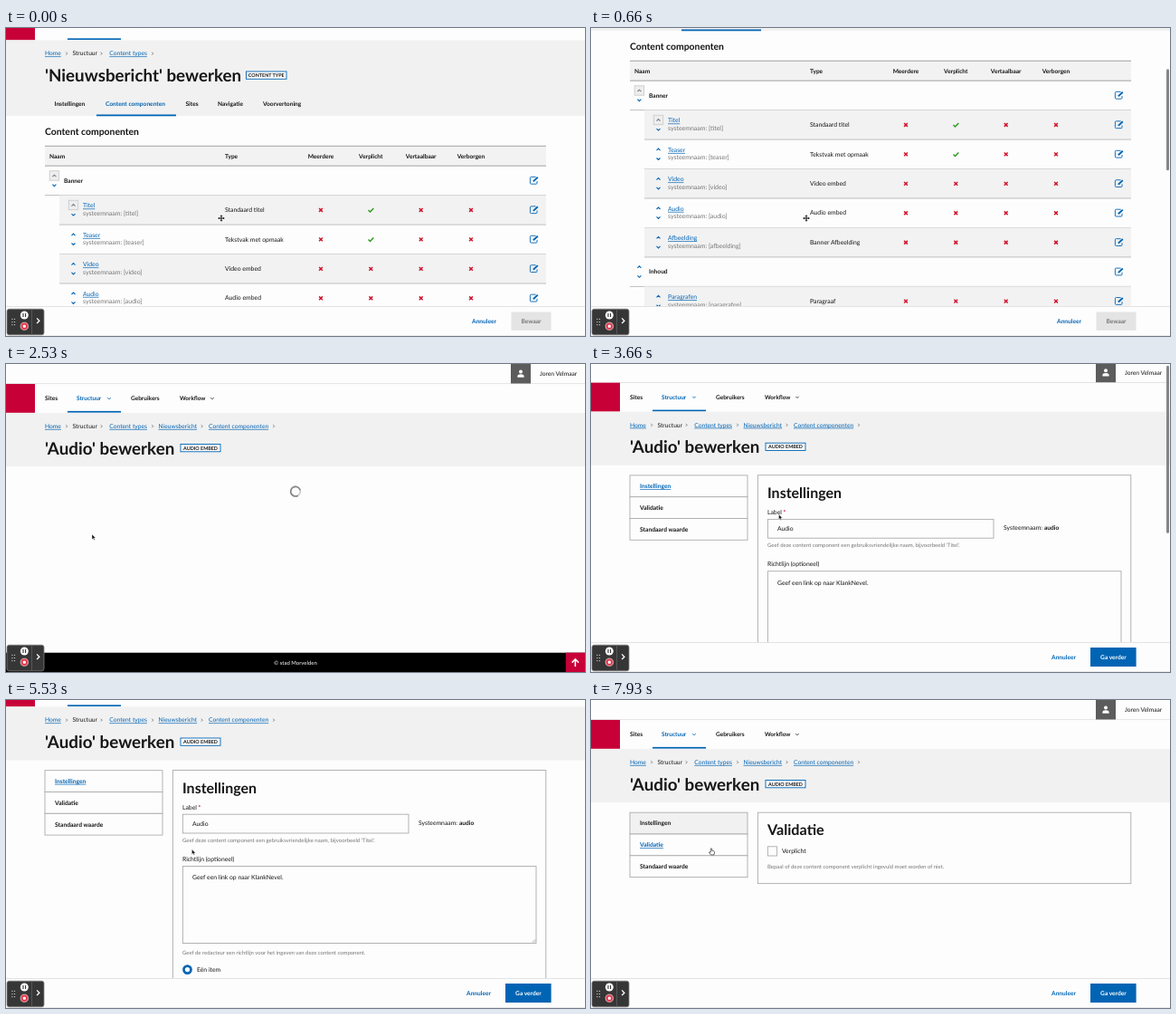
Recreate the animation shown at these times as an HTML page. Size 640 px wide and 340 px high, loop 8 s.

```html
<!DOCTYPE html>
<html lang="nl">
<head>
<meta charset="utf-8">
<title>Contenttype bewerken</title>
<style>
html, body { margin: 0; height: 100%; overflow: hidden; background: #fdfdfd; }
svg { display: block; width: 100vw; height: 100vh; }
text { font-family: Lato, "Open Sans", sans-serif; fill: #161616; text-rendering: geometricPrecision; }
.bold { font-weight: 700; }
.blue { fill: #0064b4; }
.link { fill: #0064b4; text-decoration: underline; }
.mid { text-anchor: middle; }
.gray { fill: #767676; }
.white { fill: #fff; }
.red { fill: #c80038; }
</style>
</head>
<body>
<svg id="stage" viewBox="0 0 640 340"></svg>
<script>
const BLUE = '#0064b4', RED = '#c80038', PALE = '#f1f1f1', LINE = '#acacac';

// y is the middle of the capitals
const text = (x, y, s, cls = '', size = 6.8) =>
  `<text x="${x}" y="${y + size * .36}" font-size="${size}" class="${cls}">${s}</text>`;
const bold = (x, y, s, cls = '', size = 6.6) => text(x, y, s, 'bold ' + cls, size);
const rect = (x, y, w, h, fill, more = '') =>
  `<rect x="${x}" y="${y}" width="${w}" height="${h}" fill="${fill}" ${more}/>`;
const box = (x, y, w, h, fill = '#fdfdfd', stroke = LINE) =>
  rect(x, y, w, h, fill, `stroke="${stroke}" stroke-width=".9"`);
const path = (d, stroke, width = 1, more = '') =>
  `<path d="${d}" fill="none" stroke="${stroke}" stroke-width="${width}" ${more}/>`;
const group = (id, body, y = 0) => `<g id="${id}" transform="translate(0 ${y})">${body}</g>`;
const chevron = (x, y, turn, color, size = 2, width = 1.1) =>
  path(`M${-size} ${-size / 2}L0 ${size / 2} ${size} ${-size / 2}`, color, width,
    `transform="translate(${x} ${y}) rotate(${turn})"`);

function header() {
  return rect(0, 0, 640, 54, '#fdfdfd') + rect(0, 21.3, 640, .8, '#ddd') +
    rect(558, 0, 22, 21.5, '#5c5c5c') +
    '<circle cx="569" cy="8.6" r="2" fill="#fff"/><path d="M565.4 14.8V13.4Q565.6 11.2 569 11.2T572.6 13.4V14.8Z" fill="#fff"/>' +
    text(590, 10.7, 'Joren Velmaar', '', 6.7) +
    rect(0, 22, 32, 31.8, RED) +
    bold(43, 38, 'Sites') + bold(78, 38, 'Structuur', 'blue', 6.5) +
    bold(138, 38, 'Gebruikers', '', 6.5) + bold(192, 38, 'Workflow', '', 6.4) +
    chevron(114, 38, 0, BLUE, 1.7, .9) + chevron(228, 38, 0, '#333', 1.7, .9) +
    rect(68, 51.9, 59, 1.7, BLUE);
}

function crumbs(items) {
  return items.map(([x, s, end]) =>
    text(x, 68.5, s, s === 'Structuur' ? '' : 'link', 6.7) +
    chevron(end, 68.7, -90, '#666', 1.5, .8)).join('');
}
const trail = [[43, 'Home', 67], [73.5, 'Structuur', 105.5], [114.3, 'Content types', 162]];

const badge = (x, w, s) => box(x, 88.5, w, 8.3, '#fdfdfd', BLUE) + bold(x + w / 2, 92.7, s, 'mid', 5.4);

const editIcon = y =>
  path(`M585.6 ${y - 3.8}H580.4Q579.4 ${y - 3.8} 579.4 ${y - 2.8}V${y + 3}Q579.4 ${y + 4} 580.4 ${y + 4}H586Q587 ${y + 4} 587 ${y + 3}V${y + .8}`, BLUE, .9) +
  path(`M582.8 ${y + 1.2}L587.8 ${y - 3.4}`, BLUE, 1.9);
const cross = (x, y) => path(`M${x - 1.9} ${y - 1.9}l3.8 3.8m0 -3.8l-3.8 3.8`, '#d0142c', 1.5);
const check = (x, y) => path(`M${x - 2.8} ${y}l2 2 3.8 -4`, '#2b9a1c', 1.4);

const columns = [[348, 'Meerdere'], [403.3, 'Verplicht'], [458.7, 'Vertaalbaar'], [514, 'Verborgen']];
const rows = [
  ['Banner'],
  ['Titel', 'Standaard titel', 1], ['Teaser', 'Tekstvak met opmaak', 1],
  ['Video', 'Video embed'], ['Audio', 'Audio embed'], ['Afbeelding', 'Banner Afbeelding'],
  ['Inhoud'],
  ['Paragrafen', 'Paragraaf']
];

function tableRow([name, type, required], i) {
  const y = 168.2 + 32.45 * i, left = type ? 59 : 43, cx = type ? 74.5 : 53.4;
  let s = type && i % 2 ? rect(left, y - 16, 597 - left, 32.4, '#f2f2f2') : '';
  s += rect(left, y + 16, 597 - left, .9, '#b9b9b9');
  if (i < 2) s += box(cx - 5.2, y - 10.4, 10.4, 10.4, '#eee', '#ccc');
  s += chevron(cx, y - 5, 180, i < 2 ? '#6d7f90' : BLUE) + chevron(cx, y + 5.4, 0, BLUE) + editIcon(y);
  if (!type) return s + bold(64, y, name);
  return s + text(85, y - 4.6, name, 'link') +
    text(85, y + 3.7, `systeemnaam: [${name.toLowerCase()}]`, 'gray', 6.95) +
    text(242, y, type, '', 6.85) +
    columns.map(([x], c) => (c === 1 && required ? check : cross)(x, y + .3)).join('');
}

function listPage() {
  const tabs = [[53.5, 'Instellingen'], [110, 'Content componenten', 'blue'], [198.5, 'Sites'],
    [234, 'Navigatie'], [284, 'Voorvertoning']];
  return rect(0, 54, 640, 83.5, PALE) + crumbs(trail) +
    bold(43, 92.7, "'Nieuwsbericht' bewerken", '', 18.8) + badge(265.5, 44.5, 'CONTENT TYPE') +
    tabs.map(([x, s, cls]) => bold(x, 124.6, s, cls)).join('') + rect(100, 136, 88, 1.8, BLUE) +
    group('table',
      bold(43, 114, 'Content componenten', '', 10.4) +
      rect(43, 130, 554, 22, '#f2f2f2') + rect(43, 129.8, 554, .9, '#999') + rect(43, 151.7, 554, .9, '#999') +
      bold(48, 141.2, 'Naam') + bold(242, 141.2, 'Type') +
      columns.map(([x, s]) => bold(x, 141.2, s, 'mid')).join('') +
      rows.map(tableRow).join(''), 40.5);
}

function editHead() {
  return rect(0, 54, 640, 59, PALE) +
    crumbs([...trail, [168.5, 'Nieuwsbericht', 216.5], [224, 'Content componenten', 296]]) +
    bold(43, 92.8, "'Audio' bewerken", '', 18.8) + badge(193, 44, 'AUDIO EMBED');
}

function settingsPanel() {
  return box(184.4, 77.5, 412.4, 480) + bold(195, 97, 'Instellingen', '', 16) +
    text(195, 118.3, 'Label') + bold(212.6, 118.6, '*', 'red') +
    box(195.4, 126.2, 249.6, 20.8) + text(206, 136.6, 'Audio') +
    text(456, 135.8, 'Systeemnaam:') + bold(501, 135.8, 'audio') +
    text(195, 154.8, "Geef deze content component een gebruiksvriendelijke naam, bijvoorbeeld 'Titel'.", 'gray', 6) +
    text(195, 175.8, 'Richtlijn (optioneel)') +
    box(195.4, 183.5, 390.6, 85) + text(206, 196, 'Geef een link op naar KlankNevel.') +
    path('M582 267.5l3 -3M584 267.5l1.2 -1.2', '#777', .6) +
    text(195, 279, 'Geef de redacteur een richtlijn voor het ingeven van deze content component.', 'gray', 5.95) +
    `<circle cx="200.5" cy="297.6" r="4" fill="#fff" stroke="${BLUE}" stroke-width="2.7"/>` +
    text(211, 297.6, 'Eén item');
}

function validationPanel() {
  return box(184.4, 124.2, 412.4, 78.4) + bold(195, 143.3, 'Validatie', '', 16.2) +
    box(195.4, 161.8, 10.2, 10.2) + text(211, 167, 'Verplicht') +
    text(195, 183.6, 'Bepaal of deze content component verplicht ingevuld moet worden of niet.', 'gray', 5.97);
}

function menu(active, hover, fading) {
  return ['Instellingen', 'Validatie', 'Standaard waarde'].map((s, i) =>
    box(43, 124.2 + 23.8 * i, 130, 23.8, i === hover ? PALE : '#fdfdfd') +
    bold(54, 135.9 + 24 * i, s, i === active ? 'link' : i === fading ? 'blue' : '', 6.7)).join('');
}

const bar = rect(0, 307, 640, 33, '#fdfdfd') + rect(0, 307, 640, .8, '#ddd') + rect(0, 339, 640, 1, '#e8e8e8');
const listBar = bar + bold(528.5, 323.5, 'Annuleer', 'blue mid') +
  rect(558.5, 313.5, 44, 20.3, '#e4e4e4') + bold(580.5, 323.5, 'Bewaar', 'mid gray');
const formBar = bar + bold(522.5, 323.5, 'Annuleer', 'blue mid') +
  rect(552, 313, 50.6, 21, BLUE) + bold(577.4, 323.5, 'Ga verder', 'white mid');

const loading =
  '<g id="spin"><circle r="5.3" fill="none" stroke="#ccc" stroke-width="1.6"/>' +
  '<circle r="5.3" fill="none" stroke="#888" stroke-width="1.6" stroke-dasharray="26 7.3"/></g>' +
  rect(0, 318.7, 640, 21.3, '#000') + text(320, 329.6, '© stad Morvelden', 'white mid', 6) +
  rect(618.7, 318.7, 21.3, 21.3, RED) + path('M629.3 334V326M625.6 329.6L629.3 325.8 633 329.6', '#fff', 1.6);

function recorder() {
  let s = rect(1, 310.2, 41, 28.6, '#363636', 'rx="2.5" stroke="#808080" stroke-width=".8"');
  for (let i = 0; i < 6; i++) s += rect(6.3 + 2.6 * (i % 2), 320.8 + 3.1 * (i >> 1), 1.2, 1.2, '#bbb');
  return s + '<circle cx="20.3" cy="317" r="4.5" fill="#fff"/>' + path('M19 315v4M21.6 315v4', '#333', 1.1) +
    '<circle cx="20.3" cy="329.2" r="4.1" fill="#e0354b" stroke="#f3d5d9" stroke-width=".8"/>' +
    rect(18.8, 327.7, 3, 3, '#fff') + rect(28.2, 310.5, .8, 28, '#606060') +
    chevron(35.5, 323.2, -90, '#fff', 2.8, 1.3);
}

const movePath = 'M0 -3.2V3.2M-3.2 0H3.2M-1 -2.2L0 -3.2 1 -2.2M-1 2.2L0 3.2 1 2.2M-2.2 -1L-3.2 0 -2.2 1M2.2 -1L3.2 0 2.2 1';
const pointers = {
  move: path(movePath, '#fff', 2.2) + path(movePath, '#111', 1),
  arrow: '<path d="M0 0V5.6L1.4 4.4 2.3 6.4 3.2 6 2.3 4.1H4Z" fill="#111" stroke="#fff" stroke-width=".4"/>',
  hand: '<path d="M-.7 .6Q0 -.5 .7 .6V2.8Q3.4 2.8 3.6 4.3L3 7.4H-.6L-2.6 4.6Q-2.4 3.6 -.7 4.7Z" fill="#fff" stroke="#333" stroke-width=".7"/>'
};

const stage = document.getElementById('stage');
stage.innerHTML =
  group('page', header() + group('list', listPage()) +
    group('edit', editHead() + group('menu', '') + group('settings', settingsPanel(), 46.5) +
      group('validation', validationPanel()))) +
  group('listBar', listBar) + group('formBar', formBar) + group('loading', loading) +
  rect(636, 0, 3, 0, '#858585', 'rx="1.5" id="thumb"') + recorder() +
  '<circle id="ring" fill="#fff" fill-opacity=".3" stroke="#dc6b78" stroke-width="1.3" r="11.9"/>' +
  Object.keys(pointers).map(k => group(k, pointers[k])).join('');

const $ = id => document.getElementById(id);
const show = (id, on) => $(id).style.display = on ? '' : 'none';
const smooth = u => u * u * (3 - 2 * u);

// keys: [time, ...values]
function follow(keys, t, ease = u => u) {
  if (t <= keys[0][0]) return keys[0].slice(1);
  const i = keys.findIndex(k => k[0] > t);
  if (i < 0) return keys[keys.length - 1].slice(1);
  const a = keys[i - 1], b = keys[i], u = ease((t - a[0]) / (b[0] - a[0]));
  return a.slice(1).map((v, j) => v + (b[j + 1] - v) * u);
}

const OPEN = 2330, READY = 2830, SWITCH = 6460;
const listScroll = [[0, 40.5], [660, 134.5], [860, 146.5]];
const formScroll = [[3600, 0], [4200, 46.5]];
const track = [[930, 238, 210], [1260, 88, 191], [1860, 88, 191], [2330, 95, 188], [2930, 95, 188],
  [3530, 207.5, 166], [5460, 207.5, 166], [6200, 125, 121], [7400, 125, 121], [7930, 133, 163.5]];
const clicks = [[1860, 2200, 88, 191], [6330, 6660, 125, 121]];

function draw(t) {
  const onList = t < OPEN, ready = t >= READY, switched = t >= SWITCH;
  const scroll = onList ? follow(listScroll, t)[0] : switched ? 0 : follow(formScroll, t, smooth)[0];
  $('page').setAttribute('transform', `translate(0 ${-scroll})`);
  show('list', onList);
  show('listBar', onList);
  show('edit', !onList);
  show('loading', !onList && !ready);
  show('formBar', ready);
  show('menu', ready);
  show('settings', ready && !switched);
  show('validation', switched);
  $('spin').setAttribute('transform', `translate(320 140.7) rotate(${t * .45 % 360})`);
  $('menu').innerHTML = menu(switched ? 1 : 0, t < 6130 ? -1 : t < 6660 ? 1 : 0, switched && t < 6660 ? 0 : -1);

  const size = onList ? 112 : 185;
  $('thumb').setAttribute('y', 1 + scroll * size / 340);
  $('thumb').setAttribute('height', size);
  show('thumb', (t >= 60 && t < 1460) || (t >= 3660 && t < 4730));

  const [x, y] = follow(track, t, smooth);
  const pointer = onList ? (t < 1330 ? 'move' : 'hand') : ready && x < 173 && t > 5460 ? 'hand' : 'arrow';
  for (const k in pointers) {
    show(k, k === pointer);
    $(k).setAttribute('transform', `translate(${x} ${y})`);
  }
  const click = clicks.find(c => t >= c[0] && t < c[1]);
  show('ring', click);
  if (click) {
    $('ring').setAttribute('cx', click[2]);
    $('ring').setAttribute('cy', click[3]);
  }
}

function step(t) {
  const phase = (t + 140) % 200;
  return t - (phase < 70 ? phase : phase - 70);
}

let last;
function tick() {
  const t = step(performance.now() % 8000);
  if (t !== last) draw(last = t);
  requestAnimationFrame(tick);
}
tick();
</script>
</body>
</html>
```
